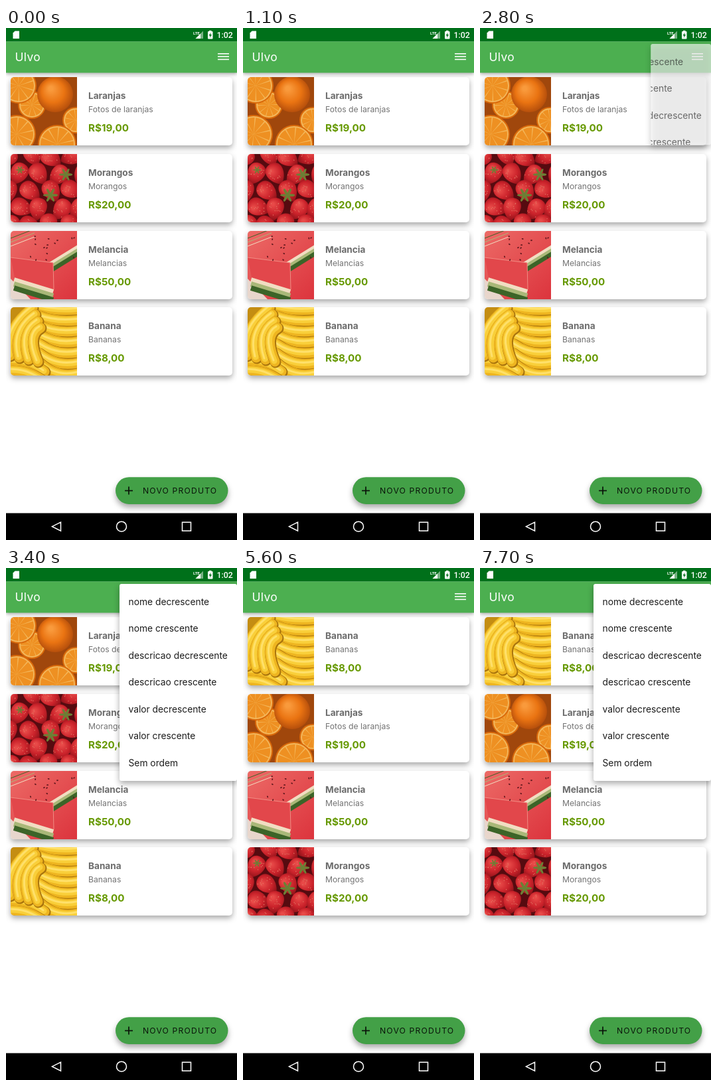
An HTML page with a canvas that plays this animation: 348x772 px, repeating every 8 s.

```html
<!DOCTYPE html>
<html lang="pt">
<head>
<meta charset="utf-8">
<title>Produtos</title>
<style>
html, body { margin: 0; width: 348px; height: 772px; overflow: hidden; background: #fff; }
canvas { display: block; width: 348px; height: 772px; }
</style>
</head>
<body>
<canvas id="stage" width="348" height="772"></canvas>
<script>
const LOOP = 8000, STEP = 100;
const W = 348, H = 772;
const STATUS_H = 20.3, BAR_BOTTOM = 67.6, NAV_TOP = 731.4;
const PIC_W = 100, PIC_H = 103;
const TAU = Math.PI * 2;
const ctx = document.getElementById('stage').getContext('2d');

function rect(c, color, x, y, w, h, r = 0) {
  c.fillStyle = color;
  c.beginPath();
  c.roundRect(x, y, w, h, r);
  c.fill();
}

function oval(c, color, x, y, rx, ry = rx, turn = 0) {
  c.fillStyle = color;
  c.beginPath();
  c.ellipse(x, y, rx, ry, turn, 0, TAU);
  c.fill();
}

function poly(c, color, ...points) {
  c.fillStyle = color;
  c.beginPath();
  points.forEach(([x, y]) => c.lineTo(x, y));
  c.fill();
}

function line(c, color, width, x1, y1, x2, y2) {
  c.strokeStyle = color;
  c.lineWidth = width;
  c.beginPath();
  c.moveTo(x1, y1);
  c.lineTo(x2, y2);
  c.stroke();
}

function label(text, x, y, size, color, weight = 400, spacing = 0, family = 'Inter') {
  ctx.font = `${weight} ${size}px ${family}, sans-serif`;
  ctx.letterSpacing = spacing + 'px';
  ctx.fillStyle = color;
  ctx.fillText(text, x, y);
}

function withShadow(alpha, blur, dy, draw) {
  ctx.save();
  ctx.shadowColor = `rgba(0,0,0,${alpha})`;
  ctx.shadowBlur = blur;
  ctx.shadowOffsetY = dy;
  draw();
  ctx.restore();
}

function picture(paint) {
  const canvas = document.createElement('canvas');
  canvas.width = PIC_W;
  canvas.height = PIC_H;
  paint(canvas.getContext('2d'), randomFrom(29));
  return canvas;
}

function randomFrom(seed) {
  return () => (seed = (seed * 16807) % 2147483647) / 2147483647;
}

function sphere(c, x, y, r, ...colors) {
  const shade = c.createRadialGradient(x - r / 4, y - r / 3, r / 9, x, y, r * 1.15);
  colors.forEach((color, i) => shade.addColorStop(i / (colors.length - 1), color));
  return shade;
}

function orangeSlice(c, x, y, r) {
  const parts = 10;
  oval(c, '#d9690a', x, y, r);
  oval(c, '#f3b65a', x, y, r - 2);
  for (let i = 0; i < parts; i++) {
    const a = i * TAU / parts + r;
    c.fillStyle = '#ee9022';
    c.beginPath();
    c.moveTo(x, y);
    c.arc(x, y, r - 4, a - 0.28, a + 0.28);
    c.fill();
  }
}

function paintOranges(c) {
  rect(c, '#a0470c', 0, 0, PIC_W, PIC_H);
  orangeSlice(c, 98, 65, 20);
  orangeSlice(c, 32, 42, 21);
  orangeSlice(c, 12, 13, 27);
  oval(c, sphere(c, 67, 26, 27, '#f99a3c', '#ea7412', '#a8450a'), 67, 26, 27);
  orangeSlice(c, 9, 86, 29);
  orangeSlice(c, 70, 101, 29);
}

function strawberry(c, x, y, turn, random) {
  c.save();
  c.translate(x, y);
  c.rotate(turn);
  c.fillStyle = sphere(c, 0, 0, 18, '#e84a48', '#cb232b', '#7d0d14');
  c.beginPath();
  c.moveTo(0, 19);
  c.bezierCurveTo(-15, 10, -20, -15, 0, -16);
  c.bezierCurveTo(20, -15, 15, 10, 0, 19);
  c.fill();
  for (let i = 0; i < 12; i++) {
    oval(c, '#e27a66', (random() - 0.5) * 18, random() * 22 - 11, 0.6, 0.8);
  }
  c.restore();
}

function leaf(c, x, y, size) {
  for (let a = 0; a < TAU; a += TAU / 6) {
    oval(c, '#6c7f35', x + Math.cos(a) * size / 2, y + Math.sin(a) * size / 2, size / 2, size / 6, a);
  }
}

function paintStrawberries(c, random) {
  rect(c, '#560b10', 0, 0, PIC_W, PIC_H);
  for (let i = 0; i < 20; i++) {
    const row = Math.floor(i / 4);
    const x = (i % 4) * 31 + (row % 2) * 14 - 5 + random() * 7;
    strawberry(c, x, row * 26 + random() * 6, (random() - 0.5) * 2.4, random);
  }
  leaf(c, 83, 31, 10);
  leaf(c, 60, 62, 11);
  leaf(c, 14, 24, 6);
}

// a strip of pale flesh, light green and dark skin, stacked downwards
function rind(c, x1, y1, x2, y2, depth) {
  ['#f1ddc2', '#a9b878', '#3c6428'].forEach((color, i) => {
    const dy = i * depth;
    line(c, color, depth * 1.3, x1, y1 + dy, x2, y2 + dy);
  });
}

function paintMelon(c, random) {
  const flesh = c.createLinearGradient(0, 0, PIC_W, PIC_H);
  flesh.addColorStop(0, '#ec6a66');
  flesh.addColorStop(1, '#dc343d');
  rect(c, flesh, 0, 0, PIC_W, PIC_H);
  rind(c, 0, 23, 36, 9, -6);
  rind(c, 60, 50, 102, 24, 5);
  poly(c, '#e8d6cc', [0, 72], [30, 103], [0, 103]);
  poly(c, '#e2474b', [0, 40], [64, 48], [65, 90], [6, 70]);
  rind(c, 5, 74, 64, 92, 6);
  line(c, '#f08d84', 1, 0, 40, 64, 48);
  line(c, '#f08d84', 1, 64, 48, 65, 88);
  for (let i = 0; i < 16; i++) {
    oval(c, '#5f171d', 30 + random() * 68, 8 + random() * 38, 0.9, 1.5, random() * 3);
  }
}

function banana(c, x1, y1, cx, cy, x2, y2) {
  const layers = [['#a9740d', 17], ['#eeb520', 15], ['#f9cf3a', 9], ['#ffe06a', 3]];
  c.lineCap = 'round';
  layers.forEach(([color, width], i) => {
    c.strokeStyle = color;
    c.lineWidth = width;
    c.beginPath();
    c.moveTo(x1 - i, y1 - i);
    c.quadraticCurveTo(cx - i, cy - i, x2 - i, y2 - i);
    c.stroke();
  });
}

function paintBananas(c) {
  rect(c, '#c48d12', 0, 0, PIC_W, PIC_H);
  for (let i = 0; i < 7; i++) banana(c, 106, 4 + i * 16, 72, 8 + i * 17, 44, i * 14);
  for (let i = 0; i < 3; i++) banana(c, -6, 82 + i * 15, 24, 78 + i * 15, 52, 98 + i * 15);
  for (let i = 0; i < 4; i++) banana(c, i * 14, 74 + i * 3, i * 11 - 8, 34 + i * 3, 34 + i * 4, 2 + i * 10);
}

function product(title, note, price, paint) {
  return { title, note, price, pic: picture(paint) };
}

const unsorted = [
  product('Laranjas', 'Fotos de laranjas', 'R$19,00', paintOranges),
  product('Morangos', 'Morangos', 'R$20,00', paintStrawberries),
  product('Melancia', 'Melancias', 'R$50,00', paintMelon),
  product('Banana', 'Bananas', 'R$8,00', paintBananas)
];
const byName = [...unsorted].sort((a, b) => a.title.localeCompare(b.title));
const options = ['nome decrescente', 'nome crescente', 'descricao decrescente', 'descricao crescente',
  'valor decrescente', 'valor crescente', 'Sem ordem'];

function drawCard(item, y, loaded) {
  withShadow(0.34, 8, 4, () => rect(ctx, '#fff', 7, y, 334, PIC_H, 5));
  ctx.save();
  ctx.beginPath();
  ctx.roundRect(7, y, 334, PIC_H, 5);
  ctx.clip();
  if (loaded) ctx.drawImage(item.pic, 7, y);
  else rect(ctx, '#b9b9b9', 7, y, PIC_W, PIC_H);
  ctx.restore();
  label(item.title, 124, y + 33, 13.6, '#6c6c6c', 700);
  label(item.note, 124, y + 53, 12.2, '#737373');
  label(item.price, 124, y + 82, 15.2, '#669900', 700);
}

function drawStatus() {
  const green = '#00701a';
  rect(ctx, green, 0, 0, W, STATUS_H);
  poly(ctx, '#fff', [13.5, 4.5], [20, 4.5], [20, 16], [10.5, 16], [10.5, 7.5]);
  label('LTE', 282, 9.5, 6, '#fff', 700, 0, 'Roboto');
  poly(ctx, '#78b284', [297, 4.5], [297, 16], [285.5, 16]);
  poly(ctx, '#fff', [293, 8.5], [293, 16], [285.5, 16]);
  rect(ctx, '#fff', 304, 5, 7.5, 11.5, 1);
  rect(ctx, '#fff', 306, 3.8, 3.5, 2);
  poly(ctx, green, [308.5, 7], [305.5, 11.5], [307.5, 11.5], [307, 15], [310, 10], [308.2, 10]);
  label('1:02', 317.5, 14.8, 12.4, '#fff', 500, 0, 'Roboto');
}

function drawAppBar() {
  withShadow(0.3, 5, 2, () => rect(ctx, '#4caf50', 0, STATUS_H, W, BAR_BOTTOM - STATUS_H));
  label('Ulvo', 13.5, 50, 17.4, '#fff', 400, 0.4);
  for (let i = 0; i < 3; i++) rect(ctx, '#fff', 319, 38 + i * 4.3, 17, 1.6);
}

function drawNavigation() {
  const y = (NAV_TOP + H) / 2, r = 6.5;
  rect(ctx, '#000', 0, NAV_TOP, W, H - NAV_TOP);
  ctx.strokeStyle = '#fff';
  ctx.lineWidth = 1.5;
  ctx.beginPath();
  ctx.moveTo(76 - r, y);
  ctx.lineTo(76 + r, y - r);
  ctx.lineTo(76 + r, y + r);
  ctx.closePath();
  ctx.moveTo(W / 2 + r + 1, y);
  ctx.arc(W / 2, y, r + 1, 0, TAU);
  ctx.rect(272 - r, y - r, r * 2, r * 2);
  ctx.stroke();
}

function drawButton() {
  const ink = '#0a150a', x = 185, y = 697.6;
  withShadow(0.34, 9, 5, () => rect(ctx, '#43a047', 165, 677.3, 169.5, 40.6, 20.3));
  line(ctx, ink, 1.7, x - 6, y, x + 6, y);
  line(ctx, ink, 1.7, x, y - 6, x, y + 6);
  label('NOVO PRODUTO', 206, 702, 12.2, ink, 400, 1.15);
}

function drawMenu(reveal, alpha) {
  const w = 177 * reveal, h = 297 * reveal, x = W - w;
  ctx.save();
  ctx.globalAlpha = alpha;
  withShadow(0.34, 10, 4, () => rect(ctx, '#fff', x, 24, w, h, 3));
  ctx.beginPath();
  ctx.rect(x, 24, w, h);
  ctx.clip();
  options.forEach((text, i) => label(text, 184.5, 55.7 + i * 40.55, 13.8, '#1c1c1c'));
  ctx.restore();
}

function menuOpening(t, start) {
  const p = Math.min(1, (t - start) / 400);
  if (p > 0) drawMenu(1 - Math.pow(1 - p, 2.5), Math.min(1, p * 2.5));
}

function render(t) {
  const sorted = t >= 5300;
  const loaded = !sorted || t >= 5400;
  rect(ctx, '#fff', 0, 0, W, H);
  (sorted ? byName : unsorted).forEach((item, i) => drawCard(item, 74 + Math.round(i * 115.75), loaded));
  drawButton();
  drawAppBar();
  drawStatus();
  drawNavigation();
  if (t < 5400) menuOpening(t, 2700);
  else if (t < 5500) drawMenu(1, 0.4);
  else menuOpening(t, 7300);
}

function tick() {
  const t = performance.now() % LOOP;
  render(Math.floor(t / STEP) * STEP);
  requestAnimationFrame(tick);
}
tick();
</script>
</body>
</html>
```
